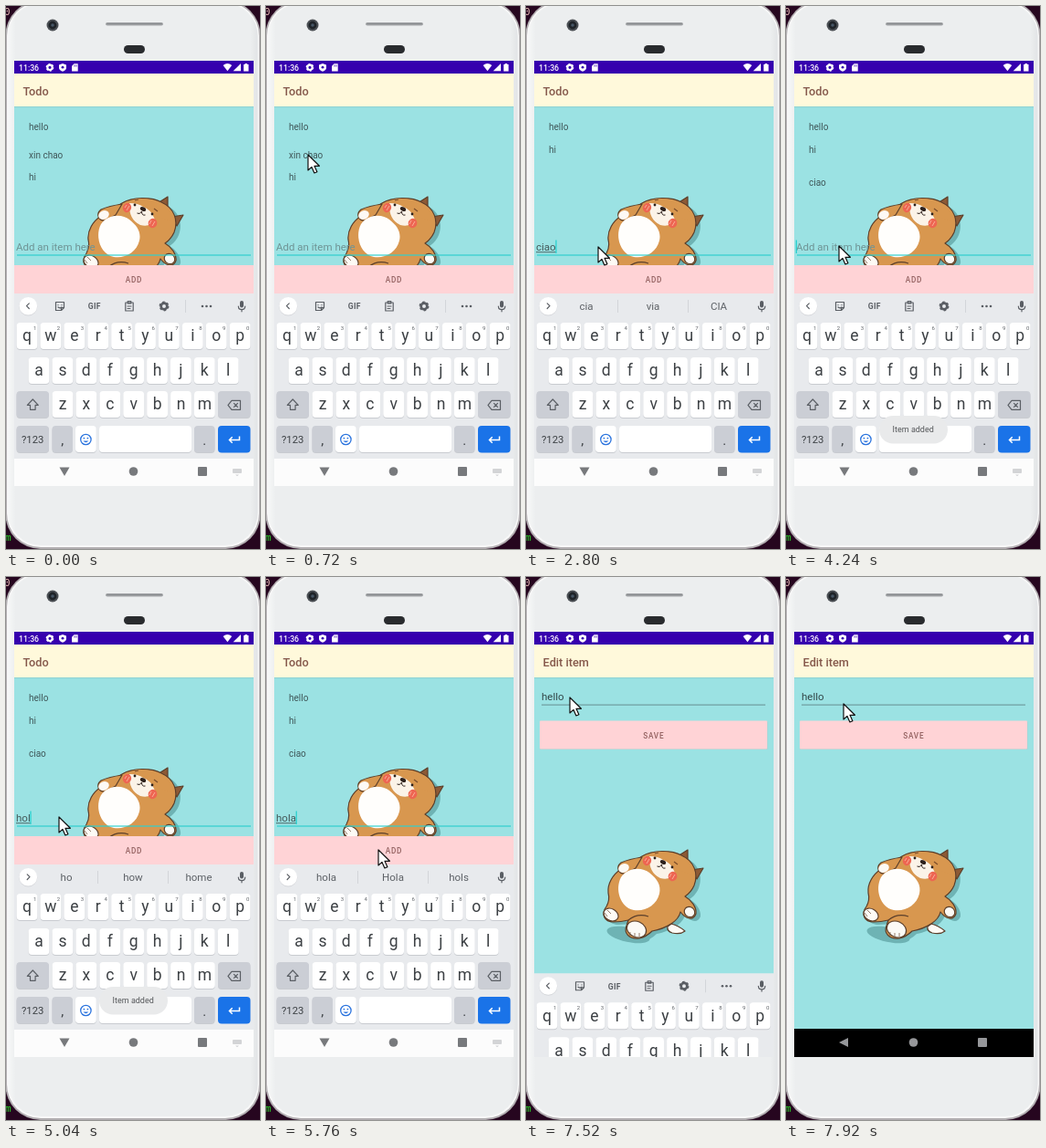
Recreate the animation shown at these times as an HTML page. Size 278 px wide and 595 px high, loop 8000 ms.

```html
<!DOCTYPE html>
<html lang="en">
<head>
<meta charset="utf-8">
<title>Todo app</title>
<style>
html, body { margin: 0; width: 100%; height: 100%; overflow: hidden; background: #26061f; }
svg { display: block; width: 100%; height: 100%; font-family: Roboto, sans-serif; }
.mid { text-anchor: middle; }
.med { font-weight: 500; }
.line { fill: none; stroke: #5a5e64; stroke-width: 1.2; stroke-linejoin: round; stroke-linecap: round; }
</style>
</head>
<body>
<svg id="stage" viewBox="0 0 278 595" preserveAspectRatio="xMinYMin meet"></svg>
<script>
const LOOP = 8000, STEP = 80;
const stage = document.getElementById('stage');
const $ = id => document.getElementById(id);

const rect = (x, y, w, h, fill, rx = 0, more = '') =>
  `<rect x="${x}" y="${y}" width="${w}" height="${h}" rx="${rx}" fill="${fill}" ${more}/>`;
const circle = (x, y, r, fill, more = '') => `<circle cx="${x}" cy="${y}" r="${r}" fill="${fill}" ${more}/>`;
const oval = (x, y, rx, ry, turn, fill, more = '') =>
  `<ellipse rx="${rx}" ry="${ry}" transform="translate(${x} ${y}) rotate(${turn})" fill="${fill}" ${more}/>`;
const path = (d, fill, more = '') => `<path d="${d}" fill="${fill}" ${more}/>`;
const icon = (x, y, d) => `<path class="line" transform="translate(${x} ${y})" d="${d}"/>`;
const text = (x, y, size, fill, s, more = '') =>
  `<text x="${x}" y="${y}" font-size="${size}" fill="${fill}" ${more}>${s}</text>`;
const mid = (x, y, size, fill, s, more = '') => text(x, y, size, fill, s, `class="mid" ${more}`);
const group = (id, body, more = '') => `<g id="${id}" ${more}>${body}</g>`;

function gear(x, y, r, color) {
  return circle(x, y, r * .62, 'none', `stroke="${color}" stroke-width="${r * .5}"`) +
    circle(x, y, r * .87, 'none', `stroke="${color}" stroke-width="${r * .28}" stroke-dasharray="${r * .46} ${r * .451}"`);
}

function phone() {
  return rect(0, 0, 278, 595, '#26061f') +
    text(-2, 10, 11, '#e6b9b5', '0', 'font-family="DejaVu Sans Mono, monospace"') +
    text(-1, 586, 11, '#27d827', 'm', 'font-family="DejaVu Sans Mono, monospace"') +
    rect(-.5, -6, 279, 601, '#b3afb2', 38) +
    rect(1, -4.5, 276, 597.5, '#f8f8f8', 37) +
    rect(2.5, -3, 273, 594, 'url(#shell)', 36) +
    circle(51, 21, 6.5, '#4a4e53') + circle(51, 21, 4.4, '#1e2328') + circle(51, 21, 1.8, '#465565') +
    rect(109, 18, 63, 3.6, '#a5a7aa', 1.8) + rect(110, 18.7, 61, 1.6, '#8b8e91', .8) +
    rect(129, 43, 23, 9, '#292b2e', 4.5);
}

function statusBar() {
  const white = '#fff';
  return rect(9, 60, 262, 14, '#3600ae') +
    text(14, 70.6, 8.7, white, '11:36', 'class="med"') +
    gear(48, 67.3, 4.3, white) +
    path('M62 63l4 1.4v3q0 3-4 4.4q-4-1.4-4-4.4v-3z', white) + circle(62, 67.2, 1.4, '#3600ae') +
    path('M74.5 63.2h4.2v8.3h-6.6v-5.8z', white) + path('M75 64.5v2M77 64.5v2', 'none', 'stroke="#3600ae" stroke-width=".8"') +
    path('M237.6 65q4.8-4 9.6 0l-4.8 6.3z', white) +
    path('M257 63v8.3h-8.3z', white) +
    path('M261.5 64v-1h2.6v1h1.4v7.4h-5.4V64z', white);
}

// Reclining dog, drawn at its place on the edit page.
function dog() {
  const ink = 'stroke="#5b3f2b" stroke-width="1.2" stroke-linejoin="round"';
  const coat = '#d8974f', white = '#fdfaf5';
  const body = 'M127 306C138 299 160 299 170 305C184 311 189 325 184 338C181 345 177 348 174 350' +
    'C181 354 187 362 186 369C183 377 175 375 169 367C167 377 154 385 138 388Q132 394 124 396' +
    'C112 397 107 390 110 382L112 376Q104 378 96 378C85 378 82 369 88 361Q92 354 90 346C89 336 95 326 104 320Z';
  return path(body, '#6eb3b4', 'transform="translate(5 3)"') + oval(112, 392, 24, 8, 12, '#6eb3b4') +
    path('M159 380q8 2 15 8q-5 4-14 2q-6-2-5-7z', white, ink) +
    path('M166 306L177 299L177 313ZM181 321L194 319L187 331Z', '#8d5a35', ink) +
    path(body, coat, ink) +
    path('M127 307Q113 309 104 313C98 318 101 326 109 325L120 319Z', coat, ink) +
    oval(107, 319, 6, 4.8, -25, white) +
    path('M104 329C112 317 128 318 135 324C144 331 148 338 146 347C143 360 130 367 118 365C103 362 97 342 104 329Z', '#fffefc') +
    path('M135 306Q145 306 150 310Q158 312 163 324Q158 333 147 330Q134 324 135 306Z', '#fbf3e8') +
    path('M137 303Q150 298 170 306Q182 314 180 326L166 321Q160 313 150 309Z', coat) +
    oval(132.5, 311, 4.6, 5.2, 20, '#ee6552') + oval(160.5, 328, 4.8, 5.2, 20, '#ee6552') +
    path('M130 311l2-3m0 6l3-5m22 20l2-4m1 6l3-5', 'none', 'stroke="#fac0a8" stroke-width=".8"') +
    circle(141, 308, 1.4, '#2d211c') + circle(160, 318, 1.4, '#2d211c') +
    oval(150, 312.5, 3.3, 2.2, 25, '#2d211c') +
    path('M148.5 315q-2 4-5 2m5-2q0 5 4 4', 'none', 'stroke="#2d211c" stroke-width="1"') +
    path('M141 303l4-1m17 10l4 3', 'none', 'stroke="#7b4d2b" stroke-width="1.2"') +
    path('M112 376Q122 368 134 372', 'none', ink) +
    oval(93, 370, 8.5, 6.4, 30, white, ink) +
    oval(179, 367, 6, 5.4, 40, white, ink) +
    oval(121, 386, 11, 8.5, 25, white, ink) +
    path('M114 389v4m5-3v5m5-5v4M86 368l3 4m0-7l4 4', 'none', 'stroke="#7b5d48" stroke-width=".8"');
}

function page(title, body, dogShift) {
  return rect(9, 60, 262, 466, '#9be2e3') +
    `<g transform="translate(0 ${dogShift})">${dog()}</g>` +
    rect(9, 74, 262, 36, '#fff9db') + rect(9, 110, 262, 2.5, 'url(#drop)') +
    text(18.6, 97.5, 12.7, '#85584b', title, 'class="med"') + body + statusBar();
}

const label = (x, y, s) =>
  mid(x, y, 8.2, '#92605f', s, 'style="font-weight:500" letter-spacing=".75"');

function mainPage() {
  const items = [['hello', 'i0'], ['xin chao', 'i1'], ['hi', 'i2'], ['ciao', 'i3'], ['hola', 'i4']];
  const ys = [136, 166.5, 191, 197, 228];
  return page('Todo',
    items.map(([s, id], i) => text(25, ys[i], 10, '#3f5658', s, `id="${id}"`)).join('') +
    text(11, 268.2, 11.5, '#6f9394', 'Add an item here', 'id="hint"') +
    text(11, 268.2, 11.5, '#45595a', '', 'id="typed"') +
    rect(11, 269.3, 0, .9, '#45595a', 0, 'id="under"') +
    rect(11, 256.5, 1.2, 14.5, '#22cfcd', 0, 'id="caret"') +
    rect(12, 272.4, 256, 1.2, '#30d0ce') +
    rect(9, 284, 262, 31, '#ffd3d6', 0, 'id="add"') + label(140, 303, 'ADD'), -90);
}

function editPage() {
  return page('Edit item',
    text(17, 135.3, 11.5, '#34484a', 'hello') + rect(17, 139.6, 245, 1, '#668f90') +
    rect(15, 158, 249.5, 31, '#a9cfd0', 1) + rect(15, 157.5, 249, 31, '#ffd3d6', 1) + label(139.8, 176.6, 'SAVE'), 0) +
    rect(9, 495, 262, 31, '#000') +
    path('M68 505v10l-10-5z', '#96979a') + circle(139.5, 510, 4.8, '#96979a') + rect(210, 505, 10, 10, '#96979a', 1);
}

function key(x, y, w, fill = '#fff') {
  return rect(x, y + 1, w, 29, '#c8cbd0', 4) + rect(x, y, w, 29, fill, 4);
}

function keyboard() {
  const ink = '#3c4044', gray = '#cbced5', pitch = 25.9;
  const row = (letters, x, y) => [...letters].map((c, i) =>
    key(x + i * pitch - 11.4, y, 22.8) + mid(x + i * pitch, y + 20.3, 17.5, ink, c)).join('');
  const digits = [...'1234567890'].map((c, i) => mid(31.6 + i * pitch, 354.5, 6, '#5f6368', c)).join('');
  const tools =
    icon(59, 329, 'M-4.5-4.5h9v6l-3 3h-6zM4.5 1.5h-3v3M-2-1.5v.2M2-1.5v.2M-2 1q2 1.6 4 0') +
    mid(96.8, 332.3, 8.6, '#5a5e64', 'GIF', 'style="font-weight:700" letter-spacing=".4"') +
    icon(135, 329, 'M-4.2-4h8.4v9h-8.4zM-1.8-5.5h3.6v2.5h-3.6zM-2 0h4M-2 2.5h3') +
    gear(173, 329, 5.4, '#5a5e64') +
    rect(196, 322, 1, 14, '#d2d5d9') +
    [215, 219.5, 224].map(x => circle(x, 329, 1.3, '#5a5e64')).join('');
  const words = [66, 139, 211].map((x, i) => mid(x, 333, 11.5, '#5d6166', '', `id="w${i}"`)).join('') +
    rect(100, 322, 1, 14, '#d2d5d9') + rect(177, 322, 1, 14, '#d2d5d9');
  return rect(9, 315, 262, 181, '#e8eaed') +
    circle(24.3, 329.5, 10, '#d4d6da') + circle(24.3, 328.7, 9.8, '#fff') +
    group('tools', icon(24, 328.7, 'M1.3-2.8L-1.5 0L1.3 2.8') + tools) +
    group('words', icon(24.5, 328.7, 'M-1.3-2.8L1.5 0L-1.3 2.8') + words) +
    rect(256, 323, 4, 7.5, '#5a5e64', 2) + icon(258, 329, 'M-3.7 0q0 3.6 3.7 3.6q3.7 0 3.7-3.6M0 3.8v2') +
    row('qwertyuiop', 23, 347) + digits + row('asdfghjkl', 36, 385) + row('zxcvbnm', 62, 422) +
    key(11.5, 422, 35.5, gray) + icon(29.3, 437, 'M0-6l6 6.3h-3.2v5h-5.6v-5h-3.2z') +
    key(232, 422, 35.5, gray) + icon(250, 437.3, 'M-7 0l4-5h9.5v10H-3zM-.5-2l4 4M3.5-2l-4 4') +
    key(11.5, 460, 35.5, gray) + mid(29.2, 479, 11.3, ink, '?123') +
    key(50.5, 460, 22.5, gray) + mid(61.8, 481, 15, ink, ',') +
    key(76, 460, 22.8) + circle(87.4, 475, 5.7, 'none', 'stroke="#2a73de" stroke-width="1.3"') +
    circle(85.4, 473.6, .9, '#2a73de') + circle(89.4, 473.6, .9, '#2a73de') +
    path('M84.5 476.5q2.9 3.4 5.8 0z', '#2a73de') +
    key(102, 460, 101) + key(206, 460, 22.5, gray) + mid(217.3, 481, 15, ink, '.') +
    rect(232, 460, 35.5, 29.5, '#1a73e8', 4) +
    path('M255.5 471.5v4h-11m3.2-3.2l-3.2 3.2l3.2 3.2', 'none', 'stroke="#fff" stroke-width="1.5"') +
    rect(9, 496, 262, 30, '#fcfcfc') +
    path('M58.5 505.5h11l-5.5 9.5z', '#77797c') + circle(139.5, 510, 4.8, '#77797c') + rect(210, 505, 10, 10, '#77797c', 1) +
    rect(248, 507, 10, 5, '#d3d4d6', 1) + path('M251 513.5h4l-2 1.8z', '#d3d4d6');
}

stage.innerHTML = `<defs>
  <linearGradient id="shell"><stop offset="0" stop-color="#f6f7f7"/><stop offset=".03" stop-color="#eceeef"/>
    <stop offset=".97" stop-color="#eceeef"/><stop offset="1" stop-color="#e2e4e6"/></linearGradient>
  <linearGradient id="drop" x2="0" y2="1"><stop stop-color="#7fb9b8" stop-opacity=".5"/><stop offset="1" stop-color="#9be2e3" stop-opacity="0"/></linearGradient>
  <clipPath id="screen">${rect(9, 60, 262, 466, '#000')}</clipPath></defs>` +
  phone() +
  group('app', group('main', mainPage()) + group('edit', editPage()) + group('keys', keyboard()) +
    group('toast', rect(0, 449, 0, 30.5, '#e9eaeb', 15.2, 'id="pill"') + mid(139.2, 467.4, 9, '#55575a', '', 'id="note"')),
    'clip-path="url(#screen)"') +
  path('M0 0v17l4-3.6l2.9 6.6l3-1.3l-2.9-6.4h5.4z', '#fff', 'id="cursor" stroke="#111" stroke-width="1.2" stroke-linejoin="round"');

// [time, x, y]
const MOVES = [
  [80, 193, 83], [480, 53, 161], [560, 53, 161], [720, 46, 163], [1120, 46, 163], [1520, 104, 264],
  [1600, 104, 264], [1840, 79, 264], [3040, 79, 264], [3200, 116, 288], [3360, 121, 296],
  [3520, 121, 296], [4000, 58, 263], [5200, 58, 263], [5600, 123, 299], [5840, 123, 299],
  [6240, 90, 157], [6320, 90, 157], [6480, 28, 128], [6640, 28, 128], [6800, 48, 132],
  [7840, 48, 132], [7920, 63, 139]
];
const TYPING = [[0, ''], [2080, 'c'], [2400, 'ci'], [2560, 'cia'], [2720, 'ciao'], [3440, ''],
  [4320, 'h'], [4880, 'ho'], [5040, 'hol'], [5200, 'hola'], [5840, '']];
const WORDS = [[0, ''], [2320, 'c can C'], [2480, 'ci city CI'], [2640, 'cia via CIA'], [2880, 'ciao Ciao CIAO'],
  [3440, ''], [4560, 'h he H'], [4960, 'ho how home'], [5120, 'hol hold Hol'], [5280, 'hola Hola hols'], [5840, '']];
const CARET = [[160, 640], [1200, 2000], [2080, 3360], [3440, 3840], [4240, 5360], [5600, 6400], [6640, 7120]];
// [in, out, left, width, message]
const TOASTS = [[1200, 2320, 88, 103, 'Item was removed'], [3680, 5040, 102, 75, 'Item added'], [6000, 7120, 102, 75, 'Item added']];

const clamp = v => Math.max(0, Math.min(1, v));
const ramp = (t, a, b) => clamp((t - a) / (b - a));
const latest = (list, t) => list.filter(e => e[0] <= t).pop()[1];
const within = (t, a, b) => t >= a && t < b;
const show = (id, on) => $(id).setAttribute('visibility', on ? 'inherit' : 'hidden');
const set = (id, name, value) => $(id).setAttribute(name, value);

function pointer(t) {
  const n = MOVES.findIndex(m => m[0] > t);
  if (n < 0) return MOVES[MOVES.length - 1].slice(1);
  if (n === 0) return MOVES[0].slice(1);
  const [a, b] = [MOVES[n - 1], MOVES[n]];
  const k = ramp(t, a[0], b[0]), e = k * k * (3 - 2 * k);
  return [a[1] + (b[1] - a[1]) * e, a[2] + (b[2] - a[2]) * e];
}

function draw(t) {
  const removed = t >= 1120;
  show('i1', !removed);
  set('i2', 'y', removed ? 160.5 : 191);
  show('i3', t >= 3520);
  show('i4', t >= 5920);

  const typed = latest(TYPING, t), words = latest(WORDS, t);
  $('typed').textContent = typed;
  const width = typed ? $('typed').getComputedTextLength() : 0;
  show('hint', !typed);
  set('under', 'width', words ? width : 0);
  set('caret', 'x', 10.7 + width);
  show('caret', CARET.some(c => within(t, ...c)));
  show('tools', !words);
  show('words', !!words);
  words.split(' ').forEach((w, i) => $('w' + i).textContent = w);
  set('add', 'fill', within(t, 3360, 3680) || within(t, 5840, 6080) ? '#f6c5c9' : '#ffd3d6');

  const toast = TOASTS.find(n => within(t, n[0], n[1] + 320));
  show('toast', !!toast);
  if (toast) {
    const [start, end, x, w, message] = toast;
    set('toast', 'opacity', ramp(t, start - 80, start + 240) * (1 - ramp(t, end, end + 320)));
    set('pill', 'x', x);
    set('pill', 'width', w);
    $('note').textContent = message;
  }

  const open = ramp(t, 7120, 7440), rise = 1 - (1 - open) ** 3;
  show('edit', open > 0);
  set('edit', 'opacity', open);
  set('edit', 'transform', `translate(0 ${36 * (1 - rise)})`);
  const drop = ramp(t, 7280, 7600);
  set('keys', 'transform', `translate(0 ${212 * drop * drop})`);
  show('keys', drop < 1);

  show('cursor', t >= 80);
  set('cursor', 'transform', `translate(${pointer(t)})`);
}

const begin = performance.now();
function tick() {
  const t = (performance.now() - begin) % LOOP;
  draw(Math.floor(t / STEP) * STEP);
  requestAnimationFrame(tick);
}
tick();
</script>
</body>
</html>
```
